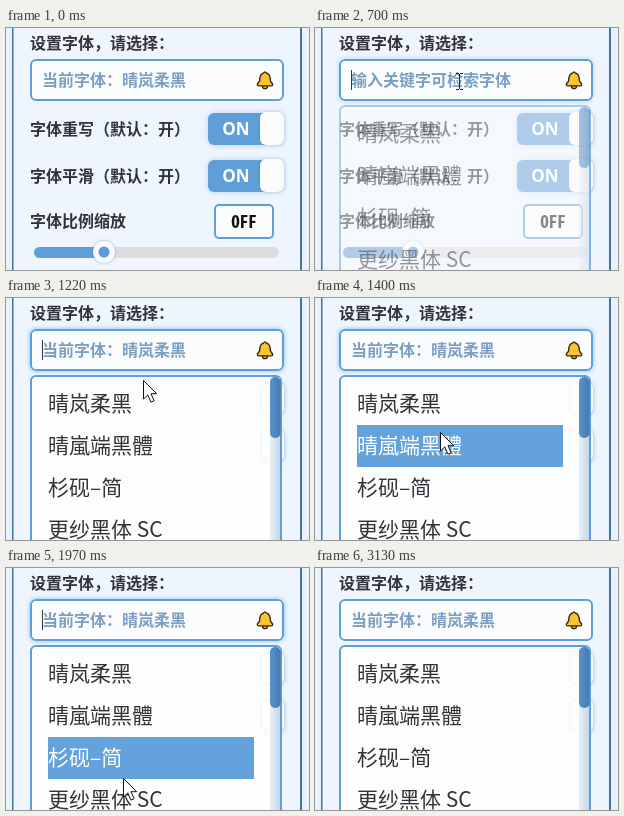
An HTML page with a canvas for the animation above (3.18 s loop, 303 by 242 pixels).

```html
<!DOCTYPE html>
<html lang="zh-CN">
<head>
<meta charset="utf-8">
<title>字体设置</title>
<style>
html, body { margin: 0; width: 100%; height: 100%; overflow: hidden; background: #eef5fe; }
canvas { display: block; width: 303px; height: 242px; }
</style>
</head>
<body>
<canvas id="stage"></canvas>
<script>
const W = 303, H = 242, LOOP = 3180;
const BLUE = '#5f9fd9', INK = '#303338', PAPER = '#fbfcfd';
const SANS = '"Noto Sans CJK SC", "Noto Sans CJK", sans-serif';
const SANS_TC = '"Noto Sans CJK TC", "Noto Sans CJK", sans-serif';
const MONO = '"Noto Sans Mono CJK SC", "Noto Sans Mono", monospace';
const LATIN = '"Open Sans", "Noto Sans", sans-serif';

const canvas = document.getElementById('stage');
const ctx = canvas.getContext('2d');
const dpr = window.devicePixelRatio || 1;
canvas.width = W * dpr;
canvas.height = H * dpr;

const FONTS = [
  { name: '晴岚柔黑', weight: 400, family: SANS },
  { name: '晴嵐端黑體', weight: 300, family: SANS_TC },
  { name: '杉砚–简', weight: 400, family: SANS },
  { name: '更纱黑体 SC', weight: 400, family: SANS }
];
const ROW_TOP = 85, ROW_H = 42.2;

// Pointer strokes: start, end, step count, then [step, x, y] points
const STROKES = [
  { from: 180, to: 520, steps: 8, path: [[0, 2, 113], [3, 97, 72], [5, 130, 59], [7, 145, 53]] },
  { from: 1120, to: 1630, steps: 12, path: [[0, 144, 57], [3, 134, 95], [6, 125, 134], [11, 120, 167]] },
  { from: 1680, to: 2200, steps: 12, path: [[0, 119, 171], [6, 117, 210], [11, 116, 235]] }
];

function pointerAt(t) {
  if (t < STROKES[0].from || t >= 2250) return null;
  const s = STROKES.filter(k => t >= k.from).pop();
  const last = s.steps - 1;
  const step = Math.min(last, Math.floor((t - s.from) / (s.to - s.from) * last + 0.25));
  const i = Math.max(1, s.path.findIndex(p => p[0] >= step));
  const a = s.path[i - 1], b = s.path[i];
  const k = (step - a[0]) / (b[0] - a[0]);
  return { x: Math.round(a[1] + (b[1] - a[1]) * k), y: Math.round(a[2] + (b[2] - a[2]) * k) };
}

function box(x, y, w, h, r, fill, stroke, line = 2) {
  const d = stroke ? line / 2 : 0;
  ctx.beginPath();
  ctx.roundRect(x + d, y + d, w - 2 * d, h - 2 * d, r);
  if (fill) { ctx.fillStyle = fill; ctx.fill(); }
  if (stroke) { ctx.strokeStyle = stroke; ctx.lineWidth = line; ctx.stroke(); }
}

function text(str, x, cy, size, color, weight = 700, family = SANS, align = 'left') {
  ctx.font = `${weight} ${size}px ${family}`;
  ctx.textAlign = align;
  ctx.fillStyle = color;
  ctx.fillText(str, x, cy + size * 0.375);
}

function disc(x, y, r, fill) {
  ctx.beginPath();
  ctx.arc(x, y, r, 0, Math.PI * 2);
  ctx.fillStyle = fill;
  ctx.fill();
}

function shadow(color, blur, draw) {
  ctx.save();
  ctx.shadowColor = color;
  ctx.shadowBlur = blur * dpr;
  draw();
  ctx.restore();
}

function toggle(y) {
  shadow('rgba(95,159,217,.35)', 6, () => box(202, y, 76, 32, 6, '#609ed8'));
  text('ON', 230, y + 16, 17, '#fff', 700, LATIN, 'center');
  shadow('rgba(60,90,130,.25)', 3, () => box(254, y - 1, 24, 33, 6, '#fbfbfc'));
}

function bell(x, y) {
  ctx.save();
  ctx.translate(x, y);
  ctx.strokeStyle = '#33291a';
  ctx.lineWidth = 1.3;
  ctx.lineJoin = 'round';
  ctx.fillStyle = '#f5a81c';
  ctx.beginPath();
  ctx.arc(0, 6.2, 2.5, 0, Math.PI * 2);
  ctx.fill();
  ctx.stroke();
  ctx.fillStyle = '#fdc42f';
  ctx.beginPath();
  ctx.moveTo(-1.3, -7);
  ctx.quadraticCurveTo(0, -9.4, 1.3, -7);
  ctx.bezierCurveTo(5, -6, 5.4, -3, 5.4, 1);
  ctx.lineTo(7.6, 4);
  ctx.quadraticCurveTo(8, 5.8, 6.4, 5.8);
  ctx.lineTo(-6.4, 5.8);
  ctx.quadraticCurveTo(-8, 5.8, -7.6, 4);
  ctx.lineTo(-5.4, 1);
  ctx.bezierCurveTo(-5.4, -3, -5, -6, -1.3, -7);
  ctx.closePath();
  ctx.fill();
  ctx.stroke();
  ctx.restore();
}

function panel() {
  ctx.fillStyle = '#e9f1fb';
  ctx.fillRect(0, 0, W, H);
  ctx.fillStyle = '#eef5fe';
  ctx.fillRect(7, 0, 288, H);
  ctx.fillStyle = '#4374a8';
  ctx.fillRect(6, 0, 1.5, H);
  ctx.fillRect(294, 0, 2, H);
  text('设置字体，请选择：', 24, 15, 16, INK);
}

function settings() {
  text('字体重写（默认：开）', 24, 101, 16, INK);
  text('字体平滑（默认：开）', 24, 148, 16, INK);
  toggle(85);
  toggle(132);
  text('字体比例缩放', 24, 193, 16, INK);
  box(208, 176, 60, 35, 4, PAPER, BLUE);
  text('OFF', 238, 194, 17, '#111', 700, MONO, 'center');
  box(28, 219, 245, 11, 5.5, '#dddddf');
  box(28, 219, 75, 11, 5.5, '#609ed8');
  shadow('rgba(50,80,120,.4)', 3, () => disc(98, 224, 11, '#f7fafd'));
  disc(98, 224, 5.5, '#5b9bd8');
}

function field(focus, hover, caret) {
  if (focus) shadow(`rgba(85,160,228,${0.65 * focus})`, 4, () => box(24, 31, 254, 42, 5, '#fff'));
  box(24, 31, 254, 42, 5, PAPER, BLUE);
  text(hover ? '输入关键字可检索字体' : '当前字体：' + FONTS[0].name, 36, 52, 16, '#7b9fc2');
  bell(259, 52);
  if (caret) {
    ctx.fillStyle = '#333';
    ctx.fillRect(36, 42, 1, 20);
  }
}

function dropdown(alpha, active, ghostLeft) {
  ctx.save();
  ctx.globalAlpha = alpha;
  box(24, 77, 252, 190, 5, '#fdfdfe', BLUE);
  ctx.restore();

  // Faint remains of the switches under the list
  if (alpha === 1) {
    ctx.save();
    ctx.beginPath();
    ctx.rect(ghostLeft, 80, 276 - ghostLeft, 90);
    ctx.clip();
    ctx.globalAlpha = 0.35;
    for (const y of [85, 132]) {
      box(254, y - 1, 24, 33, 6, null, '#e8eef5', 2);
      text('ON', 230, y + 16, 17, '#eef2f7', 700, LATIN, 'center');
    }
    ctx.restore();
  }

  ctx.save();
  ctx.globalAlpha = alpha;
  const track = ctx.createLinearGradient(264, 0, 275, 0);
  track.addColorStop(0, '#e9eff5');
  track.addColorStop(1, '#c3d4e6');
  ctx.fillStyle = track;
  ctx.fillRect(264, 80, 10, H - 80);
  ctx.fillStyle = BLUE;
  ctx.fillRect(274, 82, 2, H - 82);
  const grip = ctx.createLinearGradient(264, 0, 275, 0);
  grip.addColorStop(0, '#5b92c8');
  grip.addColorStop(1, '#4279b2');
  box(264, 79, 10.5, 61, 5, grip);

  FONTS.forEach((f, i) => {
    const top = Math.round(ROW_TOP + i * ROW_H);
    const on = i === active;
    if (on) {
      ctx.fillStyle = '#64a2dc';
      ctx.fillRect(42, top, 206, 42);
    }
    text(f.name, 42, ROW_TOP + i * 42 + 20.5, 21, on ? '#fff' : INK, f.weight + (on ? 100 : 0), f.family);
  });
  ctx.restore();
}

function arrow(x, y) {
  ctx.save();
  ctx.translate(x + 0.5, y + 0.5);
  ctx.beginPath();
  [[0, 0], [0, 18.5], [4.3, 14.4], [7.4, 21.6], [10.6, 20.2], [7.5, 13.2], [13.2, 13.2]]
    .forEach(p => ctx.lineTo(p[0], p[1]));
  ctx.closePath();
  ctx.fillStyle = '#fff';
  ctx.fill();
  ctx.strokeStyle = '#111';
  ctx.lineWidth = 1;
  ctx.stroke();
  ctx.restore();
}

function beam(x, y) {
  ctx.fillStyle = '#222';
  ctx.fillRect(x - 1, y - 7, 1, 15);
  for (const dy of [-8, 8]) {
    ctx.fillRect(x - 4, y + dy, 3, 1);
    ctx.fillRect(x, y + dy, 3, 1);
  }
}

function draw(t) {
  const ptr = pointerAt(t);
  const overField = !!ptr && ptr.y < 72;
  const open = t < 700 ? 0 : t < 800 ? 0.5 : 1;
  const focus = t < 3130 ? open : 0;
  const caret = focus > 0 && Math.floor((t - 700) / 525) % 2 === 0;

  let active = -1;
  if (open && t < 2430) {
    const y = ptr ? ptr.y : H;
    if (y >= ROW_TOP) active = Math.min(3, Math.floor((y - ROW_TOP) / ROW_H));
  }

  ctx.setTransform(dpr, 0, 0, dpr, 0, 0);
  panel();
  settings();
  field(focus, overField, caret);
  if (open) dropdown(open, active, t < 1210 ? 200 : 248);
  if (ptr) (overField ? beam : arrow)(ptr.x, ptr.y);
}

function tick() {
  draw(performance.now() % LOOP);
  requestAnimationFrame(tick);
}
tick();
</script>
</body>
</html>
```
